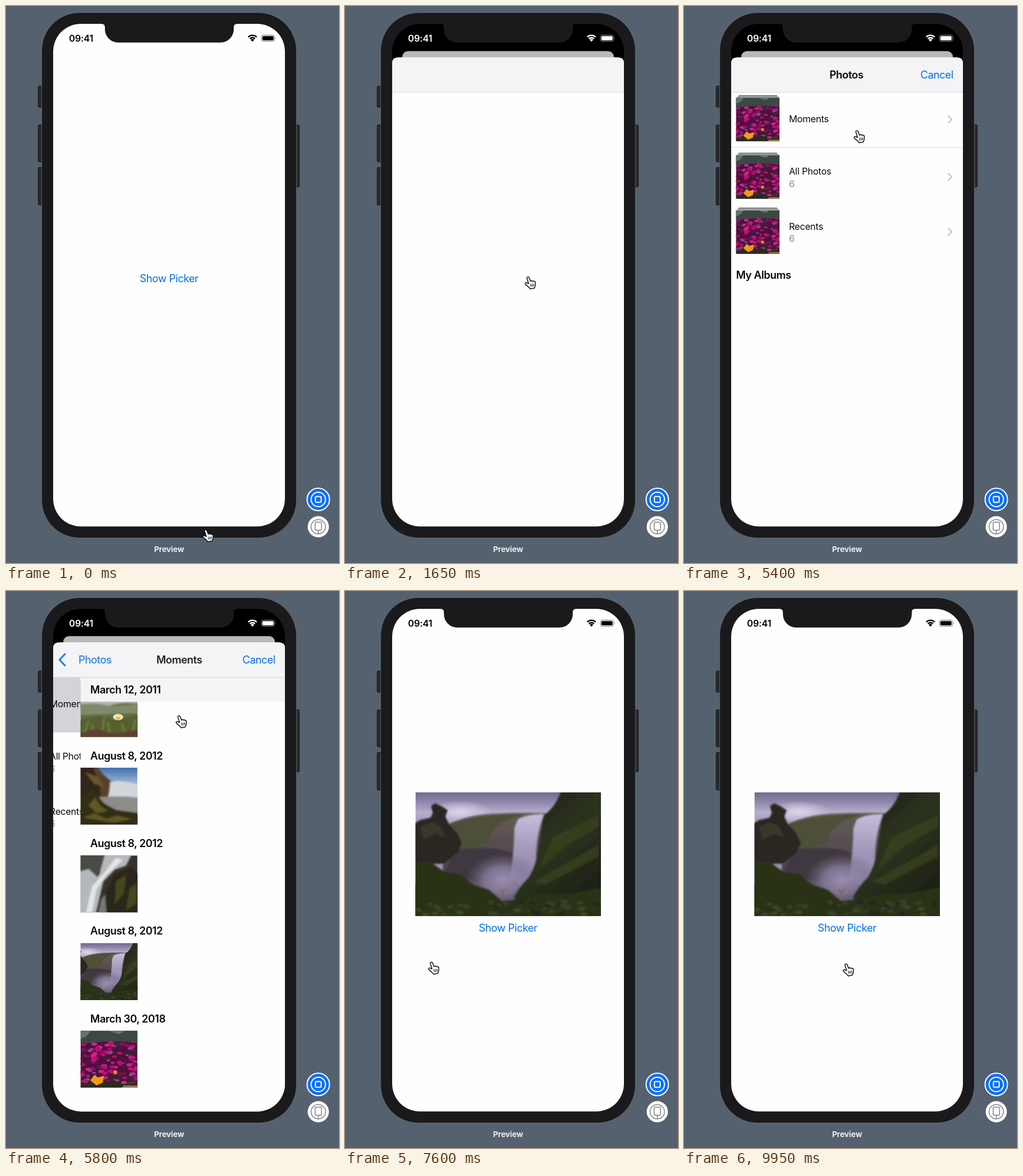
Animation, 579 px wide and 968 px high, one loop 10 s. Source, as an HTML page:

```html
<!DOCTYPE html>
<html lang="en">
<head>
<meta charset="utf-8">
<title>Photo picker preview</title>
<style>
html, body { margin: 0; width: 100%; height: 100%; overflow: hidden; background: #55616e; }
svg { display: block; width: 100%; height: 100%; }
text { font: 400 18.27px Inter, "Liberation Sans", sans-serif; letter-spacing: -.024em; fill: #09090a; }
.b { font-weight: 600; }
.s { font-size: 16.1px; letter-spacing: -.016em; }
.blue { fill: #0071e9; }
.gray { fill: #8b8b90; }
.mid { text-anchor: middle; }
.line { fill: none; stroke-linecap: round; stroke-linejoin: round; }
</style>
</head>
<body>
<svg viewBox="0 0 579 968" xmlns="http://www.w3.org/2000/svg">
<defs>
  <clipPath id="screen"><rect x="82" y="31" width="403" height="873.5" rx="48"/></clipPath>
  <clipPath id="card"><path d="M82 920V99.500Q82 89.500 92 89.500H475Q485 89.500 485 99.500V920Z"/></clipPath>
  <filter id="soft" x="-10%" y="-10%" width="120%" height="120%"><feGaussianBlur stdDeviation="1.6"/></filter>
  <linearGradient id="sky" x2="0" y2="1">
    <stop offset="0" stop-color="#716b90"/><stop offset=".08" stop-color="#8f88ac"/>
    <stop offset=".16" stop-color="#b5adcb"/><stop offset=".3" stop-color="#9c94b4"/>
  </linearGradient>
  <linearGradient id="cliff" x2="0" y2="1">
    <stop offset="0" stop-color="#655c50"/><stop offset=".3" stop-color="#584e52"/>
    <stop offset=".7" stop-color="#4d434e"/><stop offset="1" stop-color="#5d546a"/>
  </linearGradient>
  <linearGradient id="fall" x2="0" y2="1">
    <stop offset="0" stop-color="#c6bedb"/><stop offset=".5" stop-color="#a196b8"/><stop offset="1" stop-color="#8c82a4"/>
  </linearGradient>
  <linearGradient id="slope" x2=".6" y2="1">
    <stop offset="0" stop-color="#1f1d1e"/><stop offset=".5" stop-color="#2c331b"/><stop offset="1" stop-color="#1b1f17"/>
  </linearGradient>
  <linearGradient id="blue" x2="0" y2="1">
    <stop offset="0" stop-color="#416fae"/><stop offset=".3" stop-color="#a9bfd8"/><stop offset=".5" stop-color="#d5dbe2"/>
  </linearGradient>
  <radialGradient id="mist">
    <stop offset="0" stop-color="#9a8fb0"/><stop offset=".5" stop-color="#8a7fa0" stop-opacity=".8"/>
    <stop offset="1" stop-color="#6d6380" stop-opacity="0"/>
  </radialGradient>
  <radialGradient id="glow">
    <stop offset="0" stop-color="#dcd5ea"/><stop offset="1" stop-color="#dcd5ea" stop-opacity="0"/>
  </radialGradient>

  <symbol id="valley" viewBox="0 0 322 215" preserveAspectRatio="xMidYMid slice">
    <rect width="322" height="215" fill="url(#sky)"/>
    <rect x="-4" y="160" width="330" height="60" fill="#252d19"/>
    <ellipse cx="78" cy="34" rx="56" ry="20" fill="url(#glow)"/>
    <g filter="url(#soft)">
      <path d="M55 56Q90 39 135 37T228 36L240 200H40Z" fill="url(#cliff)"/>
      <path d="M60 55Q110 38 190 38Q130 52 128 86L80 105Z" fill="#4e5037"/>
      <path d="M68 100Q130 90 172 106V150L110 155L50 140Z" fill="#40383f"/>
      <path d="M178 47Q194 38 223 38Q208 74 209 125L190 165L164 150Q172 100 172 62Z" fill="url(#fall)"/>
      <ellipse cx="152" cy="152" rx="64" ry="46" fill="url(#mist)"/>
      <path d="M-6 57L8 48L26 44L30 36L27 24L34 19L45 24L56 31L52 42L58 55L72 70L81 88L74 104L50 124H-6Z" fill="#2b2623"/>
      <path d="M8 60L28 52L42 58L52 78L34 72L14 82Z" fill="#3b352b"/>
      <path d="M254 -6H328V222H185L171 181Q183 160 196 148Q210 126 214 92L222 40Q244 26 254 -6Z" fill="url(#slope)"/>
      <path d="M238 78L318 40V60L262 92L215 132ZM205 155L318 92V112L225 160Z" fill="#3c461f" opacity=".65"/>
      <path d="M-6 119L28 122L50 138L78 142L100 160L128 169L150 188L176 186L215 178L270 176L328 164V222H-6Z" fill="#293319"/>
      <g id="grass"/>
    </g>
    <path d="M152 187L151 168M145 168L151 175L160 165" stroke="#86625a" stroke-width="1.500" fill="none"/>
  </symbol>

  <symbol id="flowers" viewBox="0 0 100 100" preserveAspectRatio="xMidYMid slice">
    <rect width="100" height="100" fill="#4d123c"/>
    <path d="M0 0H100V22Q60 15 0 23Z" fill="#3c4843"/>
    <path d="M0 0H18L10 10L0 14ZM48 0H78L68 6Z" fill="#66736d"/>
    <path d="M0 84Q40 76 100 86V100H0Z" fill="#2b2a22"/>
    <g id="blooms"/>
    <path d="M17 87L25 77L30 82L41 79L39 91L28 96Z" fill="#f09a1c"/>
    <circle cx="61" cy="73" r="3.500" fill="#e8892c"/>
    <path d="M76 96H100V100H72Z" fill="#7a8740"/>
  </symbol>

  <symbol id="meadow" viewBox="0 0 100 100">
    <rect width="100" height="100" fill="#626c45"/>
    <g filter="url(#soft)">
      <path d="M-6 -6H106V42Q70 38 48 46L-6 44Z" fill="#b0b8b2"/>
      <path d="M-6 44Q24 38 56 46L106 42V58L-6 62Z" fill="#80896a"/>
      <path d="M-6 72L30 62L60 70L106 60V106H-6Z" fill="#56602f"/>
      <path d="M4 100L14 72M24 100L20 78M36 100L42 66M52 100L48 74M80 100L72 76M90 100L96 70" stroke="#6f7d40" stroke-width="3"/>
      <path d="M-6 94L28 86L58 94L106 86V106H-6Z" fill="#5f4030"/>
    </g>
    <ellipse cx="66" cy="65" rx="9" ry="5.500" fill="#ece5b6"/><ellipse cx="66" cy="67" rx="4.500" ry="2.500" fill="#dcc04a"/>
  </symbol>

  <symbol id="lagoon" viewBox="0 0 100 100">
    <rect width="100" height="100" fill="url(#blue)"/>
    <rect y="84" width="100" height="16" fill="#2c2a14"/>
    <g filter="url(#soft)">
      <path d="M-6 -6H26L40 12L52 22L62 25L50 56H-6Z" fill="#54422b"/>
      <path d="M-6 -6H20L34 30L36 70H-6Z" fill="#33261a"/>
      <path d="M8 8L30 16L42 34L24 28Z" fill="#71552a"/>
      <path d="M52 25Q75 20 106 32V54H48Q52 40 52 25Z" fill="#d3d6db"/>
      <path d="M30 52Q70 48 106 53V84H30Z" fill="#8d8d88"/>
      <path d="M-6 55L22 40L42 63L62 74L106 80V106H-6Z" fill="#302d14"/>
      <path d="M14 66L26 52L34 66L48 76L28 80ZM5 88L24 80L46 90L64 84L90 90L58 96Z" fill="#5e5823"/>
    </g>
  </symbol>

  <symbol id="rapids" viewBox="0 0 100 100">
    <rect width="100" height="100" fill="#35332b"/>
    <g filter="url(#soft)">
      <path d="M-6 -6H58L28 34L-6 36Z" fill="#494b45"/>
      <path d="M-6 30L14 24L30 38L18 58L10 106H-6Z" fill="#b4b7bb"/>
      <path d="M44 -6H92L80 18L60 25L40 46L26 106H8L16 62L34 30Z" fill="#b5b8bc"/>
      <path d="M62 4L74 8L44 36L28 60L20 100H10L20 54L42 30Z" fill="#e3e5e8"/>
      <path d="M58 34L88 20L106 38V106H40L46 62Z" fill="#29271b"/>
      <path d="M62 46L80 34L76 66L60 86ZM86 58L98 50V84L80 96Z" fill="#45461f"/>
      <path d="M36 78L43 68L46 106H30Z" fill="#74787a"/>
    </g>
  </symbol>
</defs>

<rect width="579" height="968" fill="#55616e"/>
<g fill="#29292b" stroke="#151517">
  <rect x="56" y="139" width="10" height="37" rx="2"/><rect x="56" y="206.500" width="10" height="64.500" rx="2"/>
  <rect x="56" y="280.500" width="10" height="65.500" rx="2"/><rect x="500" y="206.500" width="10" height="108" rx="2"/>
</g>
<rect x="62" y="11.500" width="443" height="913" rx="66" fill="#1a191c" stroke="#6b747d" stroke-width=".8"/>

<g clip-path="url(#screen)">
  <rect x="82" y="31" width="403" height="874" fill="#000"/>
  <g id="home">
    <rect id="homeBg" x="82" y="31" width="403" height="874" fill="#fffeff"/>
    <use id="picked" href="#valley" x="122.500" y="350" width="322.500" height="215"/>
    <text id="show" class="blue mid" x="283.500" y="480">Show Picker</text>
    <rect id="dim" x="82" y="31" width="403" height="874"/>
  </g>
  <g id="sheet"><g clip-path="url(#card)">
    <rect x="82" y="89" width="403" height="831" fill="#fffeff"/>
    <g id="list"></g>
    <g id="moments"></g>
    <g id="bar">
      <rect x="82" y="89" width="403" height="61" fill="#f4f3f5"/>
      <rect x="82" y="149.500" width="403" height="1" fill="#d6d5d8"/>
    </g>
    <g id="titles">
      <text id="title" class="b" y="126">Photos</text>
      <g id="back">
        <path class="line" d="M102.500 109.500L93 119.500L102.500 129.500" stroke="#0071e9" stroke-width="3"/>
        <text id="backText" class="blue" y="126">Photos</text>
      </g>
      <text id="next" class="b mid" y="126">Moments</text>
      <text class="blue" x="411" y="126">Cancel</text>
    </g>
  </g></g>
</g>
<path d="M164 29V31H166Q172 31 172 37V40.500A23 23 0 0 0 195 63.500H373A23 23 0 0 0 396 40.500V37Q396 31 402 31H404V29Z" fill="#1a191c"/>

<g id="status">
  <text class="s b" x="109.500" y="61.800" style="fill:currentColor;letter-spacing:-.01em">09:41</text>
  <g id="wifi" fill="none" stroke="currentColor" stroke-width="2.300"></g>
  <path d="M428.500 62L425.300 58.500Q428.500 55.800 431.700 58.500Z" fill="currentColor"/>
  <rect x="444" y="50.500" width="23" height="11" rx="3.300" fill="none" stroke="currentColor" stroke-opacity=".5"/>
  <rect x="445.700" y="52.200" width="19.600" height="7.600" rx="1.800" fill="currentColor"/>
  <path d="M468.200 54Q470 56 468.200 58Z" fill="currentColor" opacity=".5"/>
</g>

<text class="mid" x="283.500" y="948.500" style="font-size:13.600px;font-weight:700;letter-spacing:-.01em;fill:#eeeef0">Preview</text>
<g fill="none" stroke="#fff" stroke-width="2">
  <circle cx="543" cy="857.500" r="19.500" fill="#0b6ffb"/>
  <circle cx="543" cy="857.500" r="12.500"/>
  <rect x="538" y="852.500" width="10" height="10" rx="2"/>
</g>
<g fill="none" stroke="#818186" stroke-width="1.500">
  <circle cx="543" cy="905" r="18.500" fill="#fff" stroke="none"/>
  <circle cx="543" cy="905" r="12.500"/>
  <rect x="537.500" y="897" width="11" height="14" rx="1.500"/>
  <path d="M543 911V917"/>
</g>

<g id="cursor" class="line">
  <path d="M-2.200 1.500C-2.800 -.8 .8 -1.600 1.700 .6L4.300 7C5 5.600 7 5.800 7.500 7C8.500 6 10 6.400 10.400 7.600C11.500 7 12.700 7.800 12.600 9.200L12.400 14C12.200 16 11 16.600 10.800 18.800L3.400 20.300C2.600 18 -1.500 15.500 -4.800 12C-6 10.600 -4.400 8.600 -2.600 9.600L.8 11Z" fill="#fff" stroke="#111" stroke-width="1.500"/>
  <path d="M4.200 11.800L4.700 16M6.900 11.500L7.200 15.600M9.500 11.200L9.600 15.200" stroke="#111" stroke-width="1.100"/>
</g>
</svg>

<script>
const $ = id => document.getElementById(id);
const lerp = (a, b, u) => a + (b - a) * u;
const unit = (t, start, end) => Math.max(0, Math.min(1, (t - start) / (end - start)));
const smooth = u => u * u * (3 - 2 * u);
const shift = (id, x, y) => $(id).setAttribute('transform', `translate(${x} ${y})`);
const show = (id, on) => $(id).style.display = on ? '' : 'none';

// Critically damped spring that settles at the end of its span.
function spring(t, start, length) {
  const u = unit(t, start, start + length), k = 8;
  const f = v => 1 - (1 + k * v) * Math.exp(-k * v);
  return f(u) / f(1);
}

let seed = 7;
const rand = () => (seed = seed * 16807 % 2147483647) / 2147483647;

function scatter(id, count, x, y, w, h, size, colors) {
  let out = '';
  for (let i = 0; i < count; i++) {
    const r = size * (.6 + rand() * .8);
    out += `<ellipse cx="${x + rand() * w}" cy="${y + h * i / count}" rx="${r}" ry="${r * .55}" fill="${colors[i % colors.length]}"/>`;
  }
  $(id).innerHTML = out;
}

function buildList() {
  const rows = [['Moments', 155], ['All Photos', 255], ['Recents', 350.5]];
  $('list').innerHTML = '<rect id="press" x="82" y="150" width="403" height="95.500" fill="#d4d3d8"/>' +
    rows.map(([name, y], i) => `
      <rect x="95" y="${y}" width="67" height="1.200" fill="#414842"/>
      <rect x="93" y="${y + 2}" width="71" height="1.400" fill="#59615b"/>
      <use href="#flowers" x="90.500" y="${y + 4.3}" width="75.500" height="76"/>
      <text class="s" x="182.500" y="${i ? y + 38 : 201.5}">${name}</text>
      ${i ? `<text class="s gray" x="182.500" y="${y + 59.5}">6</text>` : ''}
      <path class="line" d="M459.500 ${y + 36}L465.500 ${y + 42}L459.500 ${y + 48}" stroke="#bfbfc3" stroke-width="2"/>`).join('') +
    '<rect x="82" y="245" width="403" height="1" fill="#dcdbde"/><text class="b" x="90.500" y="473.500">My Albums</text>';
}

function buildMoments() {
  const days = [['March 12, 2011', 'meadow'], ['August 8, 2012', 'lagoon'], ['August 8, 2012', 'rapids'],
    ['August 8, 2012', 'valley'], ['March 30, 2018', 'flowers']];
  $('moments').innerHTML = '<rect x="82" y="89" width="403" height="831" fill="#fffeff"/>' +
    days.map(([day, photo], i) => {
      const y = 154.7 + i * 152.4;
      return `<use href="#${photo}" x="82" y="${y}" width="99" height="99"/>` +
        (i ? '' : '<rect x="82" y="150" width="403" height="42.500" fill="#f4f3f5"/>') +
        `<text class="b" x="99" y="${i ? y - 14.5 : 178}">${day}</text>`;
    }).join('');
}

function buildWifi() {
  $('wifi').innerHTML = [6.4, 10.6].map(r => {
    const d = r * .7;
    return `<path d="M${428.5 - d} ${61.3 - d}A${r} ${r} 0 0 1 ${428.5 + d} ${61.3 - d}"/>`;
  }).join('');
}

// Pointer moves: start, end, x, y.
const moves = [[50, 650, 318.5, 471.5], [3650, 4700, 301, 217.5], [5850, 6600, 146.5, 647.5],
  [6850, 7000, 150.5, 645.8], [7700, 8700, 282, 648.8]];

function pointer(t) {
  let x = 347.5, y = 911;
  for (const [start, end, tx, ty] of moves) {
    const u = smooth(unit(t, start, end));
    x = lerp(x, tx, u);
    y = lerp(y, ty, u);
  }
  return [x, y];
}

const PRESENT = 750, BLANK = 2450, LOADED = 3500, PRESS = 5500, PUSH = 5550, DISMISS = 6900;

function render(t) {
  const up = spring(t, PRESENT, 600) - spring(t, DISMISS, 600);
  const push = spring(t, PUSH, 550);
  const loaded = t >= LOADED, chosen = t >= DISMISS;

  const scale = 1 - .087 * up;
  $('home').setAttribute('transform', `translate(283.5 ${31 + 47.5 * up}) scale(${scale}) translate(-283.5 -31)`);
  const corner = 11 * Math.min(1, up * 5);
  $('homeBg').setAttribute('rx', corner);
  $('dim').setAttribute('rx', corner);
  $('dim').setAttribute('opacity', .275 * up);
  show('picked', chosen);
  $('show').setAttribute('y', chosen ? 591.6 : 480);
  $('show').setAttribute('opacity', t >= 650 && t < 800 ? .3 : 1);
  const shade = Math.round(255 * smooth(unit(up, .25, .75)));
  $('status').style.color = `rgb(${shade},${shade},${shade})`;

  show('sheet', up > .0005);
  shift('sheet', 0, 816 * (1 - up));
  show('bar', t < BLANK || loaded);
  show('titles', loaded);
  show('list', loaded && push < 1);
  show('moments', t >= PUSH);
  show('press', t >= PRESS);
  shift('list', -121 * push, 0);
  shift('moments', 403 * (1 - push), 0);

  const left = lerp(253, 109, push);
  $('title').setAttribute('x', left);
  $('backText').setAttribute('x', left);
  $('title').setAttribute('opacity', 1 - push);
  $('back').setAttribute('opacity', push);
  $('next').setAttribute('x', 283.5 + 150 * (1 - push));
  $('next').setAttribute('opacity', push);

  shift('cursor', ...pointer(t));
}

scatter('blooms', 130, 0, 20, 100, 72, 4.2, ['#c60c7a', '#a60b6c', '#d81f8c', '#7a1053', '#bd0c76', '#3f2536', '#93418f']);
scatter('grass', 60, 0, 190, 322, 24, 5, ['#35422a', '#20271a', '#3b4a26', '#2b371c']);
buildList();
buildMoments();
buildWifi();

const began = performance.now();
function frame() {
  render((performance.now() - began) % 10000);
  requestAnimationFrame(frame);
}
frame();
</script>
</body>
</html>
```
